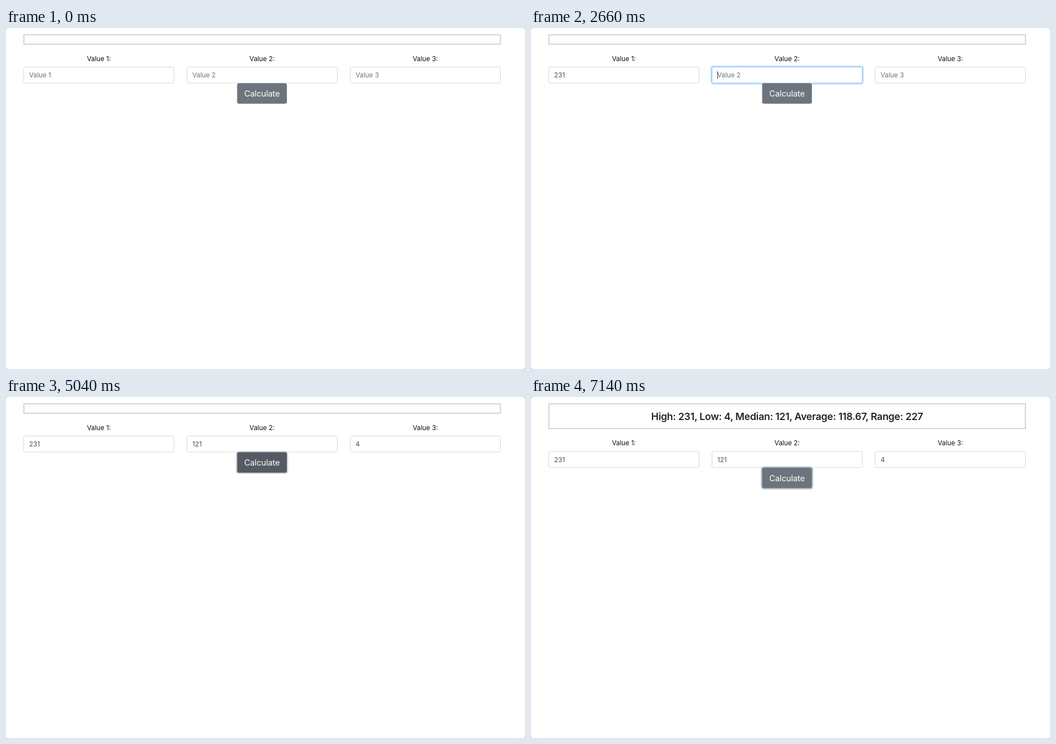
These frames come from a looping animation (922x607 px, 8540 ms). An HTML page:

```html
<!DOCTYPE html>
<html lang="en">
<head>
<meta charset="utf-8">
<title>Calculator</title>
<style>
html, body { margin: 0; height: 100%; overflow: hidden; background: #888; }
svg { display: block; width: 922px; height: 607px; font: 11.8px Inter, "Liberation Sans", sans-serif; }
.label { text-anchor: middle; fill: #111; }
.field { fill: #fff; stroke-width: .9; }
.glow { fill: #007bff; }
.button { text-anchor: middle; font-size: 14.6px; letter-spacing: -.1px; fill: #fff; }
.result { text-anchor: middle; font-size: 17.6px; font-weight: 600; letter-spacing: -.28px; fill: #212529; }
</style>
</head>
<body>
<svg viewBox="0 0 922 607"></svg>
<script>
const LOOP = 8540, STEP = 70, SHIFT = 27.5;
const svg = document.querySelector('svg');

// focus: [start, steps], blur: [start, steps], keys: [time, text], caret: [on, off]
const fields = [
  { focus: [980, 3], blur: [2520, 3], keys: [[1400, '2'], [1540, '23'], [1680, '231']], caret: [1050, 2240] },
  { focus: [2520, 3], blur: [3850, 2], keys: [[2800, '1'], [3010, '12'], [3150, '121']], caret: [2590, 3640] },
  { focus: [3850, 2], blur: [4970, 2], keys: [[4130, '4']], caret: [3920, 4620] }
];
const shades = [[0, '#6c757d'], [2450, '#5e6468'], [2520, '#666e75'], [2590, '#6c757d'],
  [4690, '#5c6369'], [4970, '#545b62'], [5110, '#636b72'], [5180, '#6c757d'],
  [6790, '#5c6369'], [7140, '#6c757d']];

function add(parent, tag, attrs, text = '') {
  const el = document.createElementNS('http://www.w3.org/2000/svg', tag);
  set(el, attrs);
  el.textContent = text;
  return parent.appendChild(el);
}
function set(el, attrs) {
  for (const k in attrs) el.setAttribute(k, attrs[k]);
}
const ramp = (t, [start, steps]) =>
  Math.max(0, Math.min(1, (Math.floor((t - start) / STEP) + 1) / steps));
const latest = (t, list, first) =>
  list.reduce((value, [at, next]) => t >= at ? next : value, first);
const mix = (a, b, k) => `rgb(${a.map((v, i) => Math.round(v + (b[i] - v) * k))})`;

add(svg, 'rect', { width: 922, height: 607, rx: 3, fill: '#fff' });
const box = add(svg, 'rect', { x: 31.75, y: 12.25, width: 846.5, fill: 'none', stroke: '#c8c8c8', 'stroke-width': 1.5 });
const result = add(svg, 'text', { class: 'result', x: 455, y: 41.2 },
  'High: 231, Low: 4, Median: 121, Average: 118.67, Range: 227');

const form = add(svg, 'g', {});
fields.forEach((f, i) => {
  const x = 31 + 290 * i;
  f.hint = `Value ${i + 1}`;
  f.x = x + 10;
  add(form, 'text', { class: 'label', x: x + 134, y: 58.8 }, f.hint + ':');
  f.glow = add(form, 'rect', { class: 'glow', x: x - 2, y: 67, width: 272, height: 33.5, rx: 5 });
  f.rect = add(form, 'rect', { class: 'field', x: x + .5, y: 69.5, width: 267, height: 28.5, rx: 2.8 });
  f.text = add(form, 'text', { x: f.x, y: 88.4 });
  f.bar = add(form, 'rect', { y: 77, width: .9, height: 14, fill: '#333' });
});
const ring = add(form, 'rect', { x: 408.3, y: 96, width: 93, height: 41, rx: 5.5, fill: '#c0c4c8' });
const button = add(form, 'rect', { x: 410.6, y: 98.2, width: 88.4, height: 36.6, rx: 3.6 });
add(form, 'text', { class: 'button', x: 454.8, y: 122.3 }, 'Calculate');

function draw(t) {
  const done = t >= 5110;
  set(box, { height: done ? 44 : 16.5 });
  set(result, { opacity: +done });
  set(form, { transform: `translate(0 ${done ? SHIFT : 0})` });
  for (const f of fields) {
    const glow = ramp(t, f.focus) - ramp(t, f.blur);
    const value = latest(t, f.keys, '');
    set(f.glow, { opacity: glow * .25 });
    set(f.rect, { stroke: mix([206, 212, 218], [128, 189, 255], glow) });
    set(f.text, { fill: value ? '#495057' : '#6c757d' });
    f.text.textContent = value || f.hint;
    const end = value ? f.text.getComputedTextLength() : 0;
    set(f.bar, { x: f.x + end, opacity: +(t >= f.caret[0] && t < f.caret[1]) });
  }
  set(ring, { opacity: ramp(t, [4970, 3]) });
  set(button, { fill: latest(t, shades) });
}

const start = performance.now();
function tick() {
  draw((performance.now() - start) % LOOP);
  requestAnimationFrame(tick);
}
tick();
</script>
</body>
</html>
```
